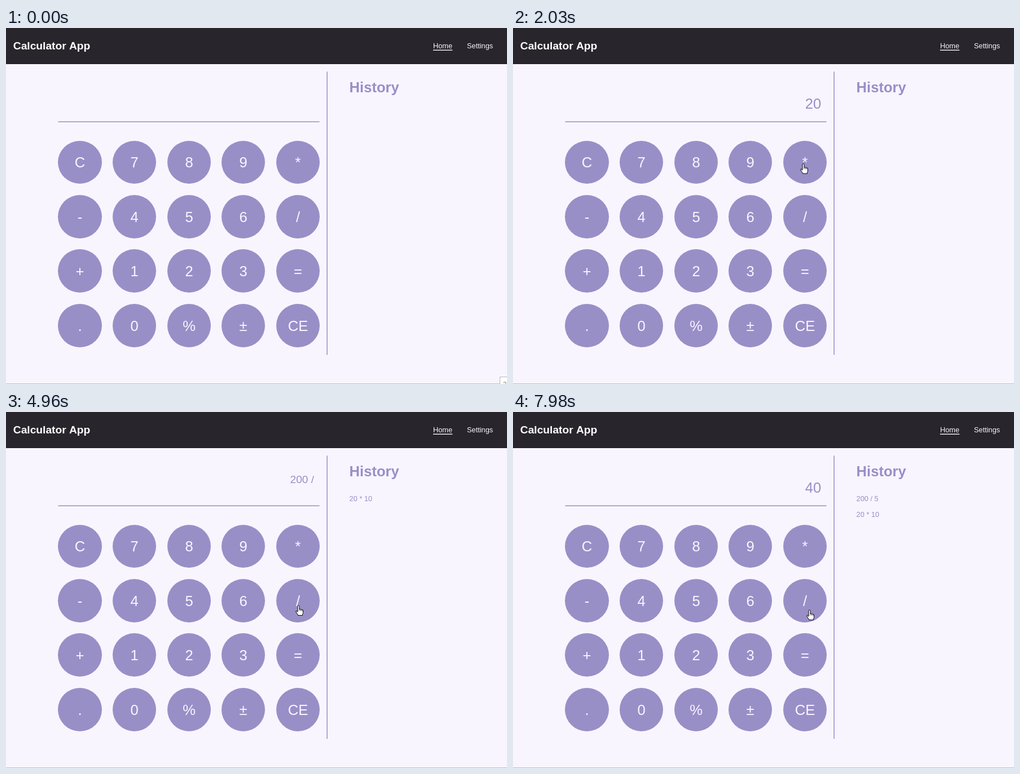
Write an HTML page that moves like this. It is 888 px wide and 631 px high and loops after 8000 ms.

```html
<!DOCTYPE html>
<html lang="en">
<head>
<meta charset="utf-8">
<title>Calculator App</title>
<style>
  html, body { margin: 0; width: 100%; height: 100%; overflow: hidden; background: #f9f5ff; }
  svg { display: block; width: 888px; height: 631px; font-family: "Liberation Sans", Arial, sans-serif; font-kerning: none; }
  .key ellipse, .ink { fill: #998fc7; }
  .key text { fill: #f9f5ff; font-size: 25.6px; text-anchor: middle; }
  .end { text-anchor: end; }
</style>
</head>
<body>
<svg viewBox="0 0 888 631">
  <rect width="888" height="631" fill="#f9f5ff"/>
  <rect width="888" height="64" fill="#28262c"/>
  <rect y="63" width="888" height="1" fill="#1f1d23"/>
  <text x="12.8" y="38" font-size="19.2" font-weight="bold" fill="#fff">Calculator App</text>
  <g font-size="12.8" fill="#f9f5ff">
    <text x="757" y="36">Home</text>
    <text x="817" y="36">Settings</text>
    <rect x="757" y="38.6" width="34.3" height="1.4"/>
  </g>
  <g class="ink">
    <rect x="92.4" y="165.5" width="463.2" height="1.5"/>
    <rect x="568.4" y="77.3" width="1.5" height="502"/>
    <text x="608.6" y="114" font-size="25.6" font-weight="bold">History</text>
    <text id="top" class="end" x="546.2" font-size="19.2"></text>
    <text id="main" class="end" x="546.2" font-size="25.6"></text>
    <text id="log0" x="608.6" y="158" font-size="12.8"></text>
    <text id="log1" x="608.6" y="186" font-size="12.8"></text>
  </g>
  <rect y="630" width="888" height="1" fill="#bfbcc4"/>
  <g id="keys"></g>
  <g id="tip">
    <rect x="875.5" y="618.5" width="20" height="20" fill="#fff" stroke="#b9b7bd"/>
    <text x="881" y="635" font-size="11" fill="#777">2</text>
  </g>
  <g id="cursor">
    <path fill="#fff" stroke="#000" stroke-linejoin="round"
      d="M-1.5 1a1.5 1.5 0 0 1 3 0V6.2q1.4-1 2.5 .3q1.5-.7 2.3 .5q1.7-.3 1.7 1.4V12q0 1.8-1 3.2V17H-.8q-.2-1.5-1.8-3.2l-2-3.2q-.6-1.8 1.2-1.5l1.9 1.8Z"/>
    <path fill="none" stroke="#000" stroke-width=".8" d="M1.5 6v3M4 6.5v2.7M6.3 7v2.4"/>
    <circle id="glow" cx="-.6" cy=".5" r="10.8" fill="#fff000" fill-opacity=".5"/>
  </g>
</svg>
<script>
const LOOP = 8000, HOLD = 140, SETTLE = 130, MS_PER_PX = 1.65;
const $ = id => document.getElementById(id);
const labels = [...'C789*-456/+123=.0%±', 'CE'];

// Key edges sit on whole pixels.
function span(origin, pitch, size, n) {
  const a = Math.round(origin + pitch * n), b = Math.round(origin + pitch * n + size);
  return { mid: (a + b) / 2, r: (b - a) / 2 };
}
const layout = labels.map((label, i) => ({
  label,
  h: span(92.4, 96.6, 77.2, i % 5),
  v: span(199.6, 96.4, 76.8, Math.floor(i / 5))
}));

$('keys').innerHTML = layout.map(({ label, h, v }) =>
  `<g class="key"><ellipse rx="${h.r}" ry="${v.r}"/><text y="9">${label}</text></g>`).join('');
const keys = [...$('keys').children];

// Key, time pressed, pointer offset from the key's centre
const clicks = [
  ['2', 810, -33, 4], ['0', 1200, 18, -18], ['*', 2100, -3, 3],
  ['1', 2720, 2, -2], ['0', 3190, -3, -10], ['=', 3930, -3, -2],
  ['/', 4750, 1, 9], ['5', 6010, -19, 13], ['=', 6840, 15, -12], ['/', 7830, 8, 17]
].map(([key, down, dx, dy]) => {
  const { h, v } = layout.find(k => k.label === key);
  return { key, down, up: down + HOLD, x: h.mid + dx, y: v.mid + dy };
});
const entry = { up: 70, x: 880, y: 655 };

const ops = { '*': (a, b) => a * b, '/': (a, b) => a / b };

function enter({ top, main, log }, key) {
  if (ops[key]) return { top: `${main} ${key}`, main: '', log };
  if (key !== '=') return { top, main: main + key, log };
  const [a, op] = top.split(' ');
  return { top: '', main: String(ops[op](+a, +main)), log: [`${top} ${main}`, ...log] };
}

// Travel time follows distance; the pointer settles just before each press.
function pointer(t) {
  const i = clicks.findIndex(c => t < c.up);
  const to = clicks[i < 0 ? clicks.length - 1 : i], from = clicks[i - 1] || entry;
  const arrive = to.down - SETTLE;
  const travel = Math.min(arrive - from.up, MS_PER_PX * Math.hypot(to.x - from.x, to.y - from.y));
  const u = Math.max(0, Math.min(1, 1 - (arrive - t) / travel));
  const s = u * u * (3 - 2 * u);
  return [from.x + (to.x - from.x) * s, from.y + (to.y - from.y) * s];
}

function show(id, text, y) {
  const el = $(id);
  if (el.textContent !== text) el.textContent = text;
  if (y) el.setAttribute('y', y);
}

function draw(t) {
  const down = clicks.find(c => t >= c.down && t < c.up && c.up < LOOP - HOLD);
  const { top, main, log } = clicks.slice(0, -1).filter(c => t >= c.up)
    .reduce((state, c) => enter(state, c.key), { top: '', main: '', log: [] });

  layout.forEach(({ label, h, v }, i) => {
    const scale = down && down.key === label ? 1.1 : 1;
    keys[i].setAttribute('transform', `translate(${h.mid} ${v.mid}) scale(${scale})`);
  });
  show('top', top, main ? 118 : 126);
  show('main', main, top ? 149 : 143);
  show('log0', log[0] || '');
  show('log1', log[1] || '');
  $('tip').style.display = t < entry.up ? '' : 'none';
  $('glow').style.display = down ? '' : 'none';
  $('cursor').setAttribute('transform', `translate(${pointer(t)})`);
}

const start = performance.now();
function tick() {
  draw((performance.now() - start) % LOOP);
  requestAnimationFrame(tick);
}
tick();
</script>
</body>
</html>
```
